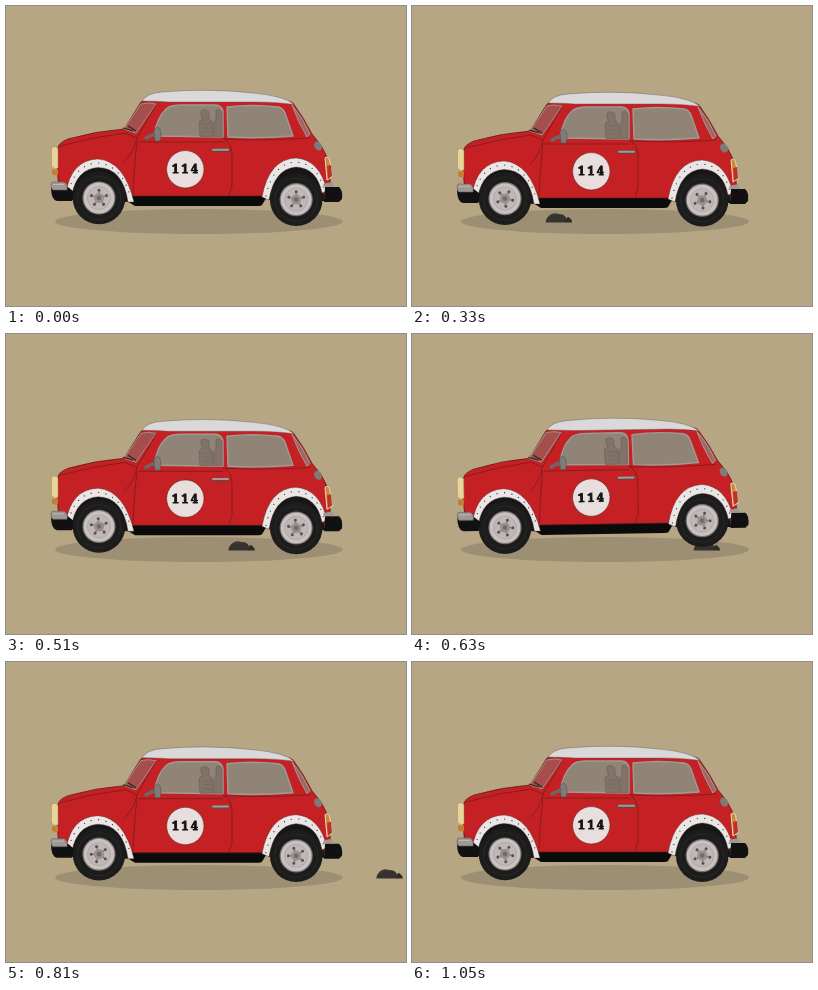
Write an HTML page that moves like this. It is 400 px wide and 300 px high and loops after 1080 ms.

```html
<!DOCTYPE html>
<html lang="en">
<head>
<meta charset="utf-8">
<title>Car over a stone</title>
<style>
html, body { margin: 0; width: 100%; height: 100%; overflow: hidden; background: #b6a684; }
svg { display: block; width: 100vw; height: 100vh; }
.number { font: 900 12px "Noto Serif", "Liberation Serif", serif; letter-spacing: 2.8px; }
.line { fill: none; stroke: #701a1a; stroke-width: .7; stroke-linecap: round; }
.glass { fill: #908477; stroke: #a09a97; stroke-width: 1.4; stroke-linejoin: round; }
.seat { fill: #817368; stroke: #6b5e53; stroke-width: .6; }
.rivets { fill: none; stroke: #333; stroke-width: 1.3; stroke-linecap: round; stroke-dasharray: 0 7.4; }
.band { fill: #eae6e6; stroke: #4b2926; stroke-width: .4; }
</style>
</head>
<body>
<svg viewBox="0 0 400 300">
  <defs>
    <g id="tyre">
      <circle r="26.3" fill="#1d1c1c"/>
      <circle r="21.5" fill="none" stroke="#292828" stroke-width="1"/>
      <circle r="16.6" fill="#777372"/>
      <circle r="15.4" fill="#c8c1c0"/>
      <circle r="11.5" fill="#c0b8b7" stroke="#a8a09f" stroke-width=".7"/>
    </g>
    <g id="hub">
      <circle r="5" fill="#99908f"/>
      <circle r="2.4" fill="#716c6b"/>
    </g>
  </defs>

  <rect width="400" height="300" fill="#b6a684"/>
  <ellipse cx="193" cy="215.5" rx="144" ry="12.5" fill="#9d8f73"/>

  <g id="stone">
    <path d="M-13 216.5 Q-13 213 -10 210 Q-6 206 0 208 Q6 208 7.5 212 L8 216.5Z" fill="#353230"/>
    <path d="M7 216.5 Q7 211 10 211 L13 214 L13.5 216.5Z" fill="#2e2b29"/>
    <path d="M-10 211 Q-5 207 1 209" fill="none" stroke="#45423f" stroke-width=".7"/>
  </g>

  <g class="body">
    <path d="M119 189 H262 L256 199 Q255 200 252 200 H129 L121 195Z" fill="#0c0b0b"/>
    <path d="M53 184 Q50 163 52 142 Q52 137 62 133 Q90 125 118 123
             L135 96 Q146 91 174 92 H265 Q283 94 287 97
             Q298 112 306 128 Q317 140 322 153 L325 183 L319 190 H127 L62 187Z"
          fill="#c52124" stroke="#541c19" stroke-width=".7"/>
    <path d="M136 95 Q141 87 156 86 Q202 82 247 87 Q279 90 288 98.5 Q272 96 249 96 H163 Q147 95 136 95Z"
          fill="#dad8d9" stroke="#555" stroke-width=".4"/>
    <path d="M118 123 L135 98 Q142 96 150 98 Q139 114 130 127Z" fill="#a64e4b" stroke="#99908c" stroke-width="1"/>
    <path d="M117 122 L127 125 M122 120 L130 125" stroke="#292523" stroke-width="1.2"/>
    <path class="glass" d="M148 130 Q151 111 160 103 Q164 99 176 99 H209 Q216 99 217 106 V131Z"/>
    <path class="seat" d="M194 130.5 L193 117 Q194 113 197 113 L195 110 V105 Q199 102 203 106 L203 113 Q207 114 207 119 V130.5Z"/>
    <path class="seat" d="M208 130.5 V117 L210 113 V104 Q214 102 216 106 V130.5Z"/>
    <path d="M196 118 H206 M197 122 H206 M197 126 H206" stroke="#716359" stroke-width=".6"/>
    <path class="glass" d="M221 101 Q246 98 272 101 Q277 102 279 107 L287 130 Q252 133 222 131Z"/>
    <path d="M286 99 Q297 112 304 128 L301 131 Q292 116 286 99Z" fill="#a4645f" stroke="#a09a97" stroke-width="1"/>
    <path class="line" d="M54 140 Q86 131 119 127 L131 132 L150 99 M131 132 Q128 147 118 156
                          M131 136 Q128 160 127 188 M133 136 H217 M217 132 Q226 137 226 148 V180 L223 189 M219 133 Q266 135 304 132"/>
    <path d="M140 132 L148 128" stroke="#6c6866" stroke-width="3.5" stroke-linecap="round"/>
    <path d="M148 124 Q151 119 154 123 Q156 129 154 135 H149Z" fill="#7f7b79" stroke="#514b48" stroke-width=".5"/>
    <path d="M207 144.3 H222" stroke="#5b4b48" stroke-width="3.4" stroke-linecap="round"/>
    <path d="M207 143.8 H222" stroke="#a39b99" stroke-width="2" stroke-linecap="round"/>
    <circle cx="179.3" cy="163.3" r="18.7" fill="#e9dede" stroke="#642421" stroke-width=".6"/>
    <text class="number" x="180.3" y="167.4" text-anchor="middle" fill="#171313" stroke="#171313" stroke-width=".9">114</text>
    <path d="M45.5 142 Q50 139 52 143 V162 Q48 164 45.5 160Z" fill="#e8d59b" stroke="#a78b55" stroke-width=".5"/>
    <path d="M46 163.5 H52 V169 Q48 170 46 168Z" fill="#c77d30"/>
    <ellipse cx="312" cy="140" rx="3.6" ry="4.8" fill="#7e7a78" transform="rotate(-30 312 140)"/>
    <path d="M319 152 Q323 149 324 156 L326 171 L321 174Z" fill="#c98a3c" stroke="#e5d8ba" stroke-width="1"/>
    <path d="M321 160 L325 159 L326 170 L322 173Z" fill="#bf3026"/>
    <path d="M64 194 Q64 159 92 159 Q117 160 123 196 Z M262 194 Q265 159 291 159 Q314 162 319 195Z" fill="#171616"/>
  </g>

  <g class="wheel"></g>
  <g class="wheel"></g>

  <g class="body">
    <path class="band" d="M60 187 Q65 154 92 153 Q118 155 128 196 H122 Q117 162 92 161.5 Q71 163 66 188Z"/>
    <path class="rivets" d="M63 185 Q69 158 92 157 Q116 159 125 193"/>
    <path class="band" d="M256 191 Q263 153 290 152 Q314 154 321 185 L316 187 Q311 162 290 161 Q268 163 263 194Z"/>
    <path class="rivets" d="M260 190 Q267 157 290 156 Q312 158 318 184"/>
    <path d="M45 181 H62 L68 186 L66 195 H51 Q45 194 45 181Z" fill="#121111"/>
    <path d="M46 176 H58 Q62 178 61 184 H47 Q45 183 45 179Z" fill="#9d9896" stroke="#67615d" stroke-width=".6"/>
    <path d="M47 178.5 H58" stroke="#bdb7b4"/>
    <path d="M319 181 H333 Q337 184 336 193 L333 196 H318Z" fill="#121111"/>
    <path d="M317 178 L326 176 L328 181 H318Z" fill="#9d9896"/>
  </g>
</svg>

<script>
const LOOP = 1080, STEP = 30, PIVOT_X = 193;
const stone = document.getElementById("stone");
const bodies = document.querySelectorAll(".body");
const wheels = [...document.querySelectorAll(".wheel")].map((node, i) => {
  let bolts = "";
  for (let k = 0; k < 5; k++) {
    bolts += `<g transform="rotate(${k * 72})"><circle cy="-7.8" r="1.5" fill="#55504f"/>` +
      `<path d="M0-6V-3" stroke="#7b7473" stroke-width="1.6"/></g>`;
  }
  node.innerHTML = `<use href="#tyre"/><g>${bolts}</g><use href="#hub"/>`;
  return { node, spin: node.children[1], x: i ? 290.2 : 93, y: i ? 193.6 : 192 };
});

// Time, vertical offset and tilt of the sprung body.
const poses = [
  [0, 0, 0], [150, 0, 0], [210, -.3, .95], [255, .5, .6], [330, 2, 0],
  [420, 1.8, 0], [510, 1.3, 0], [570, 1, 0], [620, 0, -.95],
  [720, 1.8, 0], [810, .7, 0], [900, 0, 0], [LOOP, 0, 0]
];

function poseAt(t) {
  const i = poses.findIndex(p => p[0] > t);
  const a = poses[i - 1], b = poses[i];
  const u = (t - a[0]) / (b[0] - a[0]);
  const ease = u * u * (3 - 2 * u);
  return [1, 2].map(k => a[k] + (b[k] - a[k]) * ease);
}

function lift(distance) {
  const u = Math.abs(distance) / 25;
  return u < 1 ? 5.8 * Math.cos(u * Math.PI / 2) ** 2 : 0;
}

function draw(t) {
  const stoneX = 146.6 + (t - 330) * .493;
  const [dy, tilt] = poseAt(t);
  const slope = Math.tan(tilt * Math.PI / 180);
  stone.setAttribute("transform", `translate(${stoneX} 0)`);
  bodies.forEach(body =>
    body.setAttribute("transform", `translate(0 ${dy}) rotate(${tilt} ${PIVOT_X} 165)`));
  for (const { node, spin, x, y } of wheels) {
    const wheelY = y + dy * .3 + (x - PIVOT_X) * slope - lift(stoneX - x);
    node.setAttribute("transform", `translate(${x} ${wheelY})`);
    spin.setAttribute("transform", `rotate(${-t / LOOP * 1080})`);
  }
}

const start = performance.now();
function tick() {
  const t = (performance.now() - start) % LOOP;
  draw(Math.floor(t / STEP) * STEP);
  requestAnimationFrame(tick);
}
draw(0);
requestAnimationFrame(tick);
</script>
</body>
</html>
```
